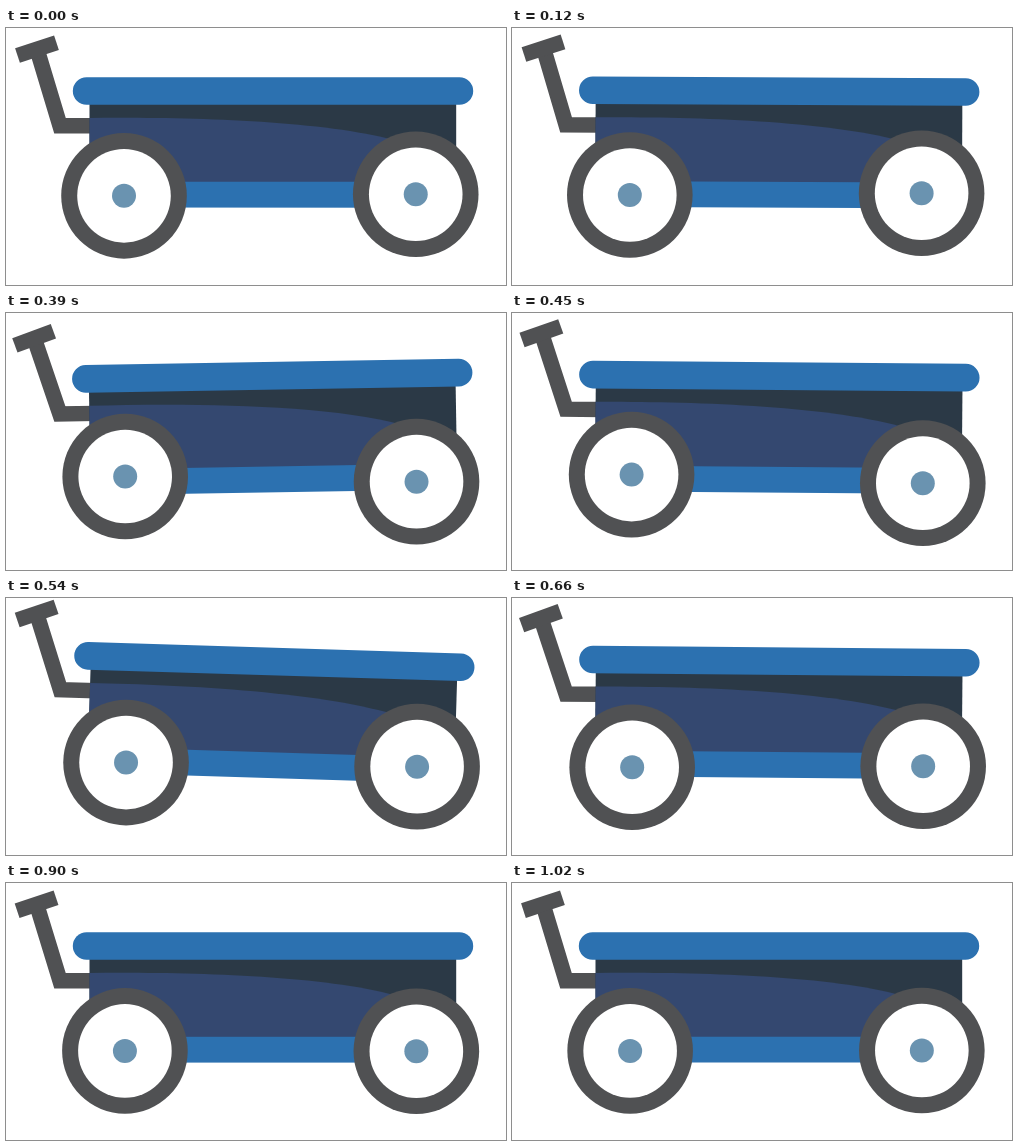
Write an HTML page with a canvas that moves like this. It is 500 by 257 pixels and loops after 1050 ms.

```html
<!DOCTYPE html>
<html lang="en">
<head>
<meta charset="utf-8">
<title>Wagon</title>
<style>
  html, body { margin: 0; height: 100%; overflow: hidden; background: #fff; }
  canvas { display: block; }
</style>
</head>
<body>
<canvas id="stage" width="500" height="257"></canvas>
<script>
const ctx = document.getElementById('stage').getContext('2d');
const LOOP = 1050, STEP = 30, WHEEL_DELAY = 240;
const BLUE = '#2c71b0', NAVY = '#344870', DARK = '#2b3946', GREY = '#505153', HUB = '#6a93b0';
const rad = Math.PI / 180;

// Bell-shaped pulse around a moment, repeating with the loop.
function bump(t, peak, width) {
  const d = (t - peak + 1.5 * LOOP) % LOOP - LOOP / 2;
  return Math.exp(-d * d / (2 * width * width));
}

// A wheel jumps over a bump, then sinks a little on landing.
const hop = (t, peak) => 2 * bump(t, peak + WHEEL_DELAY, 50) - 6.3 * bump(t, peak, 75);

// The body tips back as the front wheel hops, then forward for the rear one.
const tilt = t => .33 * bump(t, 110, 45) - 1.85 * bump(t, 320, 75) + 1.77 * bump(t, 540, 75);

// The handle flicks forward, then swings back slowly.
const swing = t => 3.4 * bump(t, 255, 50) - 2.4 * bump(t, 580, 160);

function line(width, ...points) {
  ctx.beginPath();
  points.forEach(p => ctx.lineTo(...p));
  ctx.lineWidth = width;
  ctx.strokeStyle = GREY;
  ctx.stroke();
}

function disc(x, y, r, color) {
  ctx.beginPath();
  ctx.arc(x, y, r, 0, 2 * Math.PI);
  ctx.fillStyle = color;
  ctx.fill();
}

function wheel(x, y) {
  disc(x, y, 62.8, GREY);
  disc(x, y, 46.8, '#fff');
  disc(x, y, 12, HUB);
}

function box(x, y, w, h, color) {
  ctx.fillStyle = color;
  ctx.fillRect(x, y, w, h);
}

function handle(angle) {
  const elbow = [54, 97.7];
  const turn = (x, y) => [
    elbow[0] + x * Math.cos(angle) - y * Math.sin(angle),
    elbow[1] + x * Math.sin(angle) + y * Math.cos(angle)
  ];
  line(15.5, [90, 97.7], elbow, turn(-23, -76.5));
  line(15.3, turn(-42.5, -70.1), turn(-3.5, -82.9));
}

function body() {
  box(83.5, 70, 366.7, 80, DARK);
  ctx.beginPath();
  ctx.moveTo(83.5, 90);
  ctx.bezierCurveTo(180, 89, 320, 92, 395, 114);
  ctx.lineTo(410, 155);
  ctx.lineTo(83.5, 155);
  ctx.fillStyle = NAVY;
  ctx.fill();
  box(118, 153.8, 292, 25.8, BLUE);
  ctx.beginPath();
  ctx.roundRect(66.8, 49.2, 400.4, 27.6, 13.8);
  ctx.fillStyle = BLUE;
  ctx.fill();
}

function draw(t) {
  ctx.clearRect(0, 0, 500, 257);
  ctx.save();
  ctx.translate(250, 108);
  ctx.rotate(tilt(t) * rad);
  ctx.translate(-250, -108);
  handle(swing(t) * rad);
  body();
  ctx.restore();
  const drift = Math.cos(2 * Math.PI * (t - 100) / LOOP);
  wheel(119 - 1.2 * drift, 167.9 - .9 * bump(t, 110, 45) + hop(t, 215 + WHEEL_DELAY));
  wheel(410.4 - .8 * drift, 168.2 - 2.6 * bump(t, 30, 35) + hop(t, 215));
}

const start = performance.now();
function tick() {
  const t = (performance.now() - start) % LOOP;
  draw(Math.floor(t / STEP) * STEP);
  requestAnimationFrame(tick);
}
tick();
</script>
</body>
</html>
```
